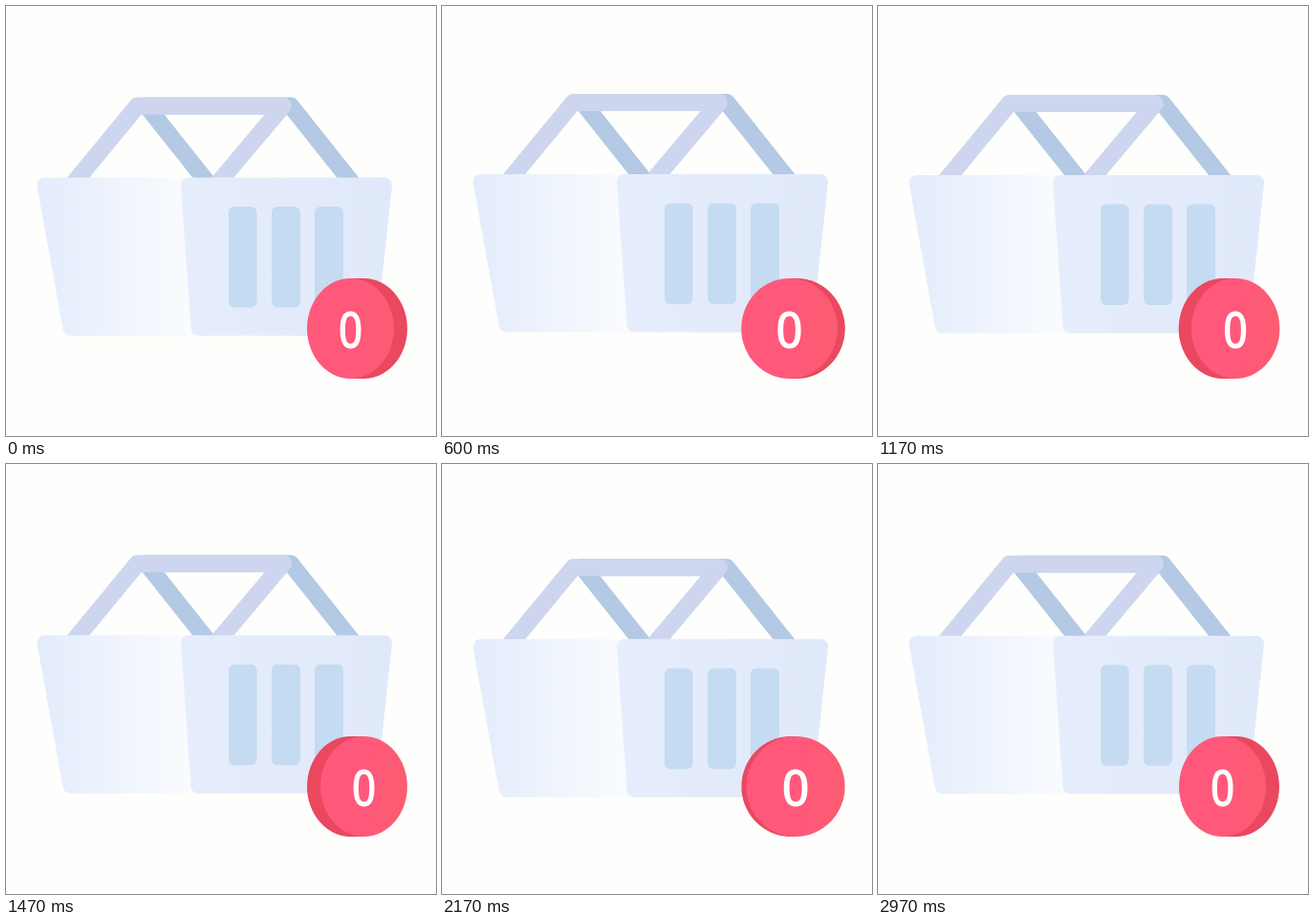
Write an HTML page that moves like this. It is 450 px wide and 450 px high and loops after 3.01 s.

```html
<!DOCTYPE html>
<html lang="en">
<head>
<meta charset="utf-8">
<title>Empty basket</title>
<style>
  html, body { margin: 0; width: 100%; height: 100%; overflow: hidden; background: #fefefc; }
  svg { display: block; width: 100vw; height: 100vh; }
  .handle { fill: none; stroke-width: 18; stroke-linejoin: round; }
  .panel { stroke-width: 16; stroke-linejoin: round; }
  text { font: 600 52px "Open Sans", "Noto Sans", sans-serif; text-anchor: middle; fill: #fffefe; }
</style>
</head>
<body>
<svg viewBox="0 0 450 450">
  <defs>
    <linearGradient id="side" gradientUnits="userSpaceOnUse" x1="33" x2="190" y1="0" y2="0">
      <stop offset="0" stop-color="#e3ecfc"/>
      <stop offset="1" stop-color="#f9fbfe"/>
    </linearGradient>
    <linearGradient id="front" gradientUnits="userSpaceOnUse" x1="183" x2="404" y1="0" y2="0">
      <stop offset="0" stop-color="#e6edfc"/>
      <stop offset="1" stop-color="#e0e9fa"/>
    </linearGradient>
    <linearGradient id="coin">
      <stop offset=".5" stop-color="#ff587b"/>
      <stop offset="1" stop-color="#fc5c70"/>
    </linearGradient>
  </defs>
  <g id="basket">
    <path class="handle" stroke="#b3c9e4" d="M215 190L147 104.500H298L366 190"/>
    <path class="handle" stroke="#cdd6ee" d="M67 190L137.500 104.500H290L218 190"/>
    <path class="panel" fill="url(#side)" stroke="url(#side)" d="M40.500 187.500H196L202 337H67.500Z"/>
    <path class="panel" fill="url(#front)" stroke="url(#front)" d="M191 187.500H396L380 337H201.500Z"/>
    <g fill="#c5dbf1">
      <rect x="233" y="210" width="29.500" height="105.500" rx="6"/>
      <rect x="278" y="210" width="30" height="105.500" rx="6"/>
      <rect x="323" y="210" width="30" height="105.500" rx="6"/>
    </g>
  </g>
  <g transform="translate(367.500 337.500)">
    <g fill="#e9485f">
      <ellipse id="back" ry="52.500"/>
      <rect id="rim" y="-52.500" height="105"/>
    </g>
    <ellipse id="face" ry="52.500" fill="url(#coin)"/>
    <text id="count" y="20.500">0</text>
  </g>
</svg>
<script>
  const PERIOD = 3010, RADIUS = 52.5, DEPTH = 14, MAX_TURN = Math.PI / 6;
  const $ = id => document.getElementById(id);
  const set = (id, attrs) => {
    for (const name in attrs) $(id).setAttribute(name, attrs[name]);
  };
  const ease = p => p < .5 ? (2 * p) ** 3.5 / 2 : 1 - (2 - 2 * p) ** 3.5 / 2;

  function draw(now) {
    const phase = now % PERIOD / PERIOD;
    const bob = -3.8 * Math.sin(2 * Math.PI * phase);
    set("basket", { transform: `translate(0 ${bob})` });

    // The coin swings left to right and back about its vertical axis.
    const swing = ease(1 - Math.abs(1 - 2 * phase));
    const turn = MAX_TURN * (2 * swing - 1);
    const shift = DEPTH * Math.sin(turn), squash = Math.cos(turn);
    const rx = RADIUS * squash;
    set("back", { cx: -shift, rx });
    set("face", { cx: shift, rx });
    set("rim", { x: -Math.abs(shift), width: 2 * Math.abs(shift) });
    set("count", { transform: `translate(${shift} 0) scale(${squash} 1)` });
  }

  const start = performance.now();
  function tick() {
    draw(performance.now() - start);
    requestAnimationFrame(tick);
  }
  tick();
</script>
</body>
</html>
```
